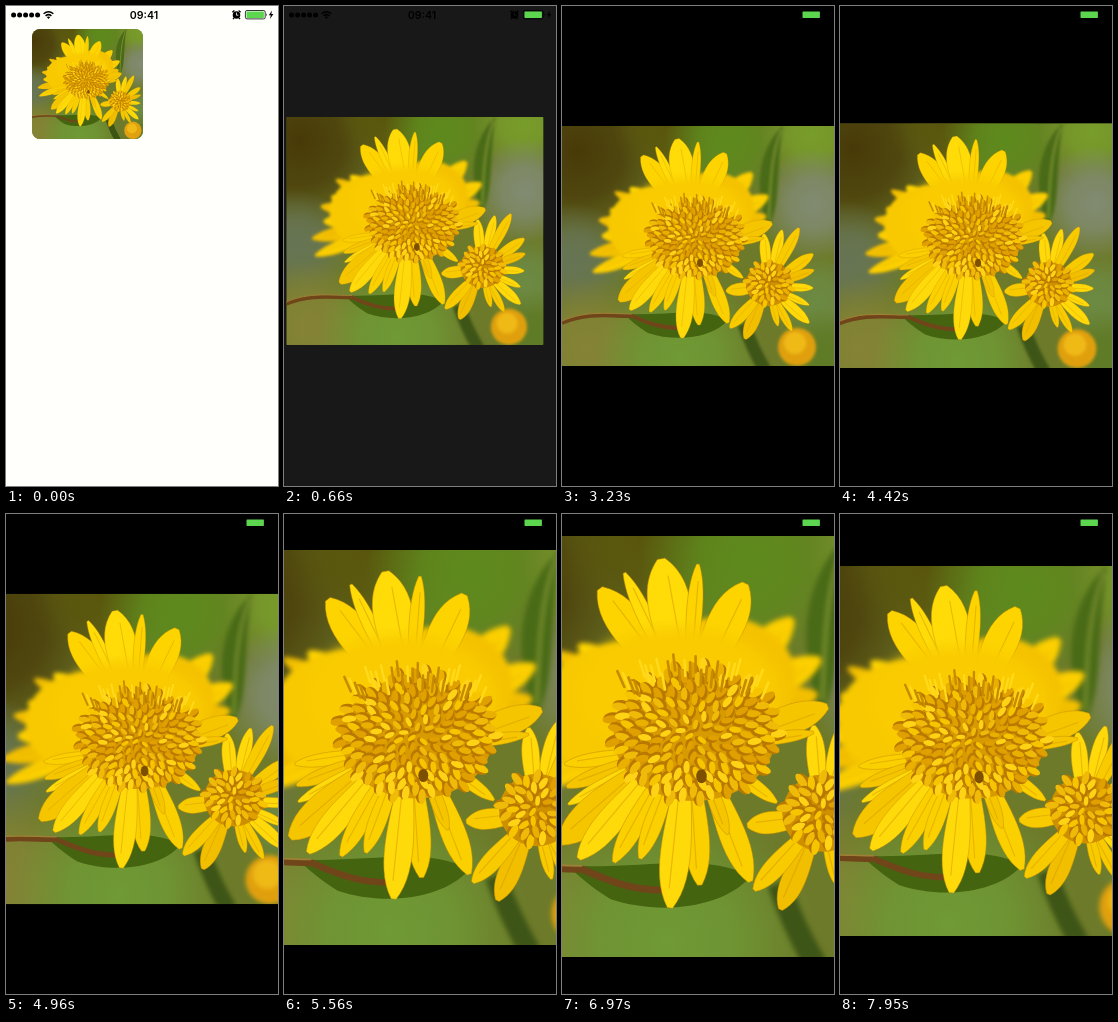
Write an HTML page that moves like this. It is 272x480 px and loops after 8 s.

```html
<!DOCTYPE html>
<html lang="en">
<head>
<meta charset="utf-8">
<title>Photo viewer</title>
<style>
  html, body { margin: 0; width: 100%; height: 100%; overflow: hidden; background: #fffffb; }
  #stage { display: block; width: 100vw; height: 100vh; }
  .clock { font: 600 10.6px Inter, Roboto, sans-serif; text-anchor: middle; }
</style>
</head>
<body>
<svg id="stage" viewBox="0 0 272 480">
  <defs>
    <filter id="soft" x="-20%" y="-20%" width="140%" height="140%"><feGaussianBlur stdDeviation="1.6"/></filter>
    <filter id="haze" x="-40%" y="-40%" width="180%" height="180%"><feGaussianBlur stdDeviation="4"/></filter>
    <clipPath id="frame"><rect id="frameRect"/></clipPath>
  </defs>
  <rect width="272" height="480" fill="#fffffb"/>
  <rect id="shade" width="272" height="480"/>
  <g clip-path="url(#frame)">
    <svg id="photo" viewBox="0 0 272 240" preserveAspectRatio="xMidYMid slice">
      <rect width="272" height="240" fill="#6d7a2a"/>
      <g id="backdrop"></g>
      <g filter="url(#soft)">
        <path d="M182 198Q190 222 203 244" fill="none" stroke="#3d5512" stroke-width="13"/>
        <path d="M221 0C204 14 194 45 199 72C201 92 205 104 208 98C219 78 214 38 221 0Z" fill="#4a6a18"/>
        <path d="M219 4C209 30 208 60 207 94" fill="none" stroke="#79902f" stroke-width="2"/>
        <circle cx="235" cy="221" r="19" fill="#e0a010"/>
        <circle cx="233" cy="217" r="11" fill="#efb916"/>
      </g>
      <path d="M62 188C105 190 140 180 166 194C150 213 112 216 86 207C75 200 68 194 62 188Z" fill="#456410"/>
      <path d="M0 197C25 186 48 190 70 190C88 198 100 202 118 202" fill="none" stroke="#70451a" stroke-width="4"/>
      <path d="M0 195C25 184 48 188 70 188" fill="none" stroke="#a08036" stroke-width="1"/>
      <g id="blurred" filter="url(#soft)"></g>
      <g id="flower"></g>
    </svg>
  </g>
  <g id="status">
    <g id="signal"></g>
    <g fill="none" stroke="#000" stroke-width="1.5">
      <path d="M37.6 7.8Q42.5 3.6 47.4 7.8M39.6 9.8Q42.5 7.4 45.4 9.8"/>
    </g>
    <path d="M40.8 11.1Q42.5 9.9 44.2 11.1L42.5 13Z"/>
    <text class="clock" x="138" y="12.7">09:41</text>
    <circle cx="230.5" cy="9" r="3.8"/>
    <path d="M226.4 6.3L228.4 4.6M234.6 6.3L232.6 4.6M228 12L227 13.2M233 12L234 13.2" stroke="#000" stroke-width="1.3"/>
    <path d="M230.5 6.6V9.2H232.4" fill="none" stroke="#fff" stroke-width=".8" id="hands"/>
    <rect x="239.4" y="4.5" width="19.8" height="8.4" rx="1.6" fill="none" stroke="#000" stroke-width=".8"/>
    <rect x="240.5" y="5.5" width="17.4" height="6.4" rx=".6" fill="#5cd64f"/>
    <path d="M260.2 7.2Q261.6 8.7 260.2 10.2Z"/>
    <path d="M266 4.6L262.8 9.3H264.8L264 13.1L267.4 8.1H265.3Z"/>
  </g>
</svg>
<script>
const $ = id => document.getElementById(id);

function add(parent, tag, attrs) {
  const el = document.createElementNS(parent.namespaceURI, tag);
  setAll(el, attrs);
  parent.append(el);
  return el;
}
function setAll(el, attrs) {
  for (const key in attrs) el.setAttribute(key, attrs[key]);
}

let seed = 11;
const random = () => (seed = (seed * 16807) % 2147483647) / 2147483647;
const pick = list => list[Math.floor(random() * list.length)];

// A petal widens toward a rounded tip.
function petal(parent, [bx, by], [tx, ty, width], fill, vein = '#d79b00') {
  const dx = tx - bx, dy = ty - by, len = Math.hypot(dx, dy);
  const nx = -dy / len * width, ny = dx / len * width;
  const at = (k, side) => `${bx + dx * k + nx * side} ${by + dy * k + ny * side}`;
  add(parent, 'path', {
    d: `M${at(0, .12)}C${at(.45, .35)} ${at(.78, .75)} ${at(1, .08)}` +
       `L${at(1, -.08)}C${at(.78, -.75)} ${at(.45, -.35)} ${at(0, -.12)}Z`,
    fill, stroke: '#c58b00', 'stroke-width': .5, 'stroke-opacity': .6
  });
  add(parent, 'path', {
    d: `M${at(.3, .08)}L${at(.88, .08)}`, stroke: vein, 'stroke-width': .7, 'stroke-opacity': .55
  });
}

// Short florets fan out from the centre, smaller and denser toward the middle.
function florets(parent, cx, cy, rx, ry, count) {
  for (let i = count; i > 0; i--) {
    const r = Math.sqrt(i / count), a = i * 2.39996;
    const x = cx + Math.cos(a) * rx * r, y = cy + Math.sin(a) * ry * r;
    const size = 2.2 + 1.9 * r, turn = a * 180 / Math.PI + random() * 50 - 25;
    const place = `translate(${x} ${y}) rotate(${turn})`;
    add(parent, 'ellipse', { cx: -1, cy: 1, rx: size * 1.25, ry: size * .72, fill: '#b97900', transform: place });
    add(parent, 'ellipse', { rx: size * 1.15, ry: size * .55, transform: place,
      fill: pick(['#f6c500', '#eab000', '#ffd315', '#e0a000', '#f0bb08']) });
  }
}

function drawBackdrop() {
  const blobs = [
    [15, 25, 105, '#483a08'], [105, 0, 55, '#59560c'], [165, 14, 62, '#5d8a1c'],
    [250, 8, 52, '#789d2a'], [12, 135, 58, '#667455'], [252, 78, 56, '#818b72'],
    [255, 175, 48, '#6c8a43'], [25, 222, 72, '#858336'], [118, 232, 85, '#6f9a35'],
    [262, 230, 48, '#5e7b26']
  ];
  blobs.forEach(([x, y, r, color], i) => {
    const gradient = add($('backdrop'), 'radialGradient', { id: 'tone' + i });
    [[0, 1], [.45, .8], [1, 0]].forEach(([offset, opacity]) =>
      add(gradient, 'stop', { offset, 'stop-color': color, 'stop-opacity': opacity }));
    add($('backdrop'), 'circle', { cx: x, cy: y, r, fill: `url(#tone${i})` });
  });
}

function drawFlower() {
  const back = $('blurred'), front = $('flower');
  const heart = [132, 108], small = [206, 160];

  const far = [[28, 128, 17], [31, 146, 15], [37, 94, 17], [53, 66, 14], [68, 62, 18],
    [40, 110, 20], [48, 84, 20], [190, 47, 22], [206, 70, 20], [178, 58, 20], [204, 90, 18]];
  far.forEach(tip => petal(back, heart, tip, pick(['#f3c000', '#fbcf00', '#ffd800'])));
  add(back, 'ellipse', { cx: 92, cy: 100, rx: 46, ry: 39, fill: '#f8c900' });
  add(back, 'ellipse', { cx: 150, cy: 82, rx: 42, ry: 36, fill: '#f5c200' });

  const upper = [[80, 30, 23], [94, 21, 10], [115, 13, 27], [136, 16, 10], [163, 27, 24]];
  upper.forEach(tip => petal(front, [130, 96], tip, pick(['#ffdc08', '#fdd400'])));
  add(front, 'ellipse', { cx: 125, cy: 90, rx: 58, ry: 38, fill: '#f9cb00', filter: 'url(#haze)' });

  const secondary = [[220, 104, 11], [237, 102, 12], [251, 128, 13], [252, 144, 10], [251, 162, 9],
    [247, 179, 8], [247, 197, 12], [230, 205, 9], [216, 200, 8], [183, 213, 15], [168, 202, 13],
    [164, 165, 14], [202, 108, 12]];
  secondary.forEach(tip => petal(front, small, tip, pick(['#f8cb00', '#ffd90a', '#f1be00'])));
  add(front, 'ellipse', { cx: 207, cy: 158, rx: 23, ry: 22, fill: '#cf9000' });
  florets(front, 207, 157, 23, 21, 42);

  const lower = [[210, 97, 19], [202, 112, 8], [60, 130, 9], [61, 143, 10], [62, 153, 8],
    [57, 175, 22], [68, 184, 17], [88, 186, 13], [103, 184, 12], [137, 199, 16], [120, 212, 19],
    [166, 197, 17], [153, 170, 9], [181, 152, 9]];
  lower.forEach(tip => petal(front, [131 + (tip[0] - 131) * .16, 121], tip,
    pick(['#fbd000', '#ffda0a', '#f5c500'])));

  add(front, 'ellipse', { cx: 134, cy: 114, rx: 46, ry: 37, fill: '#d79a00' });
  florets(front, 134, 112, 49, 39, 150);
  for (let i = 0; i < 28; i++) {
    const x = 94 + i * 2.9, y = 84 - Math.sin(i / 27 * Math.PI) * 9 + random() * 12;
    add(front, 'path', { d: `M${x} ${y}l${(x - 134) * .1} -9`, stroke: pick(['#ffd91a', '#c78b00']),
      'stroke-width': 1.5, 'stroke-linecap': 'round' });
  }
  add(front, 'ellipse', { cx: 138, cy: 137, rx: 3, ry: 4, fill: '#7c5000' });
}

const thumb = { cx: 81.5, cy: 78, w: 111, h: 110 };
const full = { cx: 136, cy: 240, w: 272, h: 240 };
const mix = (a, b, k) => a + (b - a) * k;

// Pinch: time, scale, vertical centre.
const pinch = [
  [4300, 1, 240], [4480, 1.03, 239.5], [4720, 1.12, 238], [4960, 1.292, 235], [5140, 1.446, 234.5],
  [5560, 1.646, 233.5], [5880, 1.8, 232], [6400, 1.795, 232], [6970, 1.754, 232.5],
  [7300, 1.798, 232], [7540, 1.79, 232], [7770, 1.683, 234], [7950, 1.542, 237], [8000, 1.5, 238]
];

function pinchAt(t) {
  if (t <= pinch[0][0]) return pinch[0].slice(1);
  const i = pinch.findIndex(step => step[0] >= t);
  const a = pinch[i - 1], b = pinch[i], k = (t - a[0]) / (b[0] - a[0]);
  return [mix(a[1], b[1], k), mix(a[2], b[2], k)];
}

function openAt(t) {
  const x = Math.max(0, t - 100) * .0071;
  return t > 1730 ? 1 : 1 - (1 + x) * Math.exp(-x);
}

function render(t) {
  const open = openAt(t), [scale, zoomY] = pinchAt(t);
  const width = mix(thumb.w, full.w, open) * scale;
  const height = mix(thumb.h, full.h, open) * scale;
  const cx = mix(thumb.cx, full.cx, open);
  const cy = mix(thumb.cy, full.cy, open) + zoomY - full.cy;
  const box = { x: cx - width / 2, y: cy - height / 2, width, height };
  setAll($('photo'), box);
  setAll($('frameRect'), { ...box, rx: 8 * (1 - open) });
  $('shade').setAttribute('opacity', open);
  $('hands').setAttribute('opacity', 1 - open);
}

for (let i = 0; i < 5; i++) add($('signal'), 'circle', { cx: 7.6 + i * 6, cy: 9, r: 2.5 });
drawBackdrop();
drawFlower();

const start = performance.now();
function tick() {
  render((performance.now() - start) % 8000);
  requestAnimationFrame(tick);
}
tick();
</script>
</body>
</html>
```
